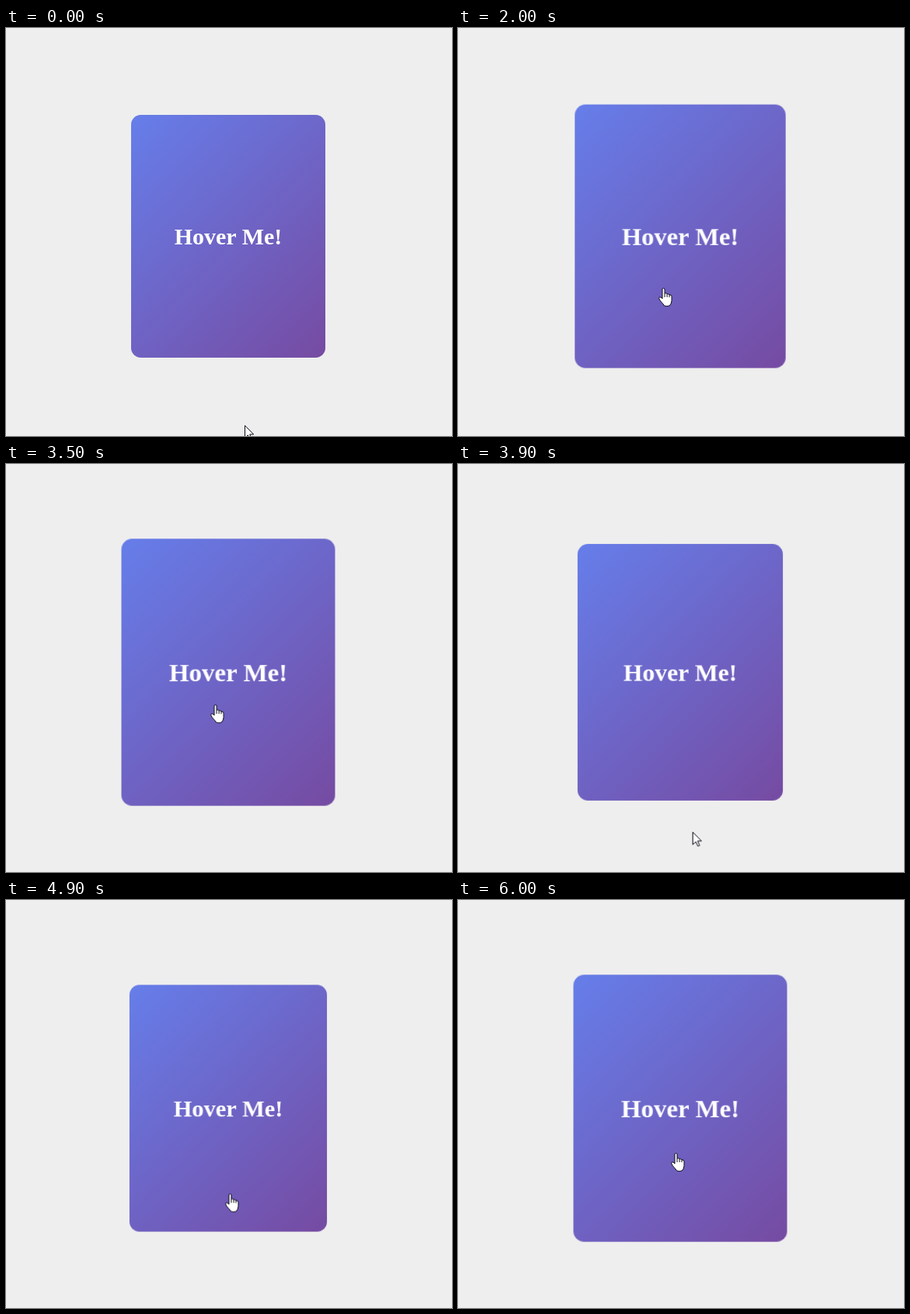
Recreate the animation shown at these times as an HTML page. Size 574 px wide and 526 px high, loop 6.1 s.

```html
<!DOCTYPE html>
<html lang="en">
<head>
<meta charset="utf-8">
<title>Hover card</title>
<style>
  html, body { margin: 0; width: 100%; height: 100%; overflow: hidden; background: #eee; }
  #card {
    position: absolute; left: 161px; top: 112px; width: 250px; height: 313px;
    display: flex; align-items: center; justify-content: center;
    border-radius: 12.5px; will-change: transform;
    background: linear-gradient(135deg, #667eea, #764ba2);
    color: #fff; font: bold 30px "Liberation Serif", serif; white-space: nowrap;
  }
  #cursor { position: absolute; left: 0; top: 0; overflow: visible; }
  #cursor path { fill: #fff; stroke: #0b0b18; stroke-linejoin: round; }
  #cursor .knuckles { fill: none; }
</style>
</head>
<body>
<div id="card">Hover Me!</div>
<svg id="cursor" width="20" height="26">
  <path id="arrow" d="M.5 .5V16.5L4.3 12.9 7 18.6 9.3 17.6 6.7 11.9H11.7Z"/>
  <g id="hand" transform="translate(-6)">
    <path d="M5 14V2Q5 .5 6.5 .5T8 2V7Q10.6 6.2 11.1 8 13.4 7.2 14 9 16.8 8.4 17 11.2V16.5Q16.8 20.5 14.3 23 10.7 24.4 7.5 23C6 20 2 17.5 .7 13.6Q.5 11.2 3 12Z"/>
    <path class="knuckles" d="M8 7V12M11.1 8V12M14 9V12.2"/>
  </g>
</svg>
<script>
const LOOP = 6100, STEP = 100, FADE = 500;
const GLIDE = "cubic-bezier(.35, 0, .5, 1)";
const hovers = [[1720, 3770], [4830, LOOP]];

const el = id => document.getElementById(id);
const card = el("card"), cursor = el("cursor"), arrow = el("arrow"), hand = el("hand");

const key = (time, transform, easing) => ({ offset: time / LOOP, transform, easing });
const scaleAt = (time, scale) => key(time, `scale(${scale})`, "ease");
const pointAt = (time, x, y, easing = "linear") => key(time, `translate(${x}px, ${y}px)`, easing);

function timeline(target, frames) {
  const animation = target.animate(frames, { duration: LOOP, fill: "both" });
  animation.pause();
  return animation;
}

const scaling = hovers.flatMap(([enter, leave]) => [
  scaleAt(enter, 1), scaleAt(enter + FADE, 1.1), scaleAt(leave, 1.1),
  ...(leave < LOOP ? [scaleAt(leave + FADE, 1)] : [])
]);

// Each move runs from a resting point to the next one
const pointing = [
  pointAt(0, 307, 512), pointAt(1450, 307, 512, GLIDE),
  pointAt(2000, 264, 335, "ease-out"), pointAt(2300, 268, 305),
  pointAt(3440, 268, 305, GLIDE), pointAt(4050, 305, 491),
  pointAt(4700, 305, 491, "ease"), pointAt(5200, 280, 326),
  pointAt(LOOP, 280, 326)
];

const timelines = [
  timeline(card, [scaleAt(0, 1), ...scaling]),
  timeline(cursor, pointing)
];

const start = performance.now();
function draw() {
  const elapsed = (performance.now() - start) % LOOP;
  const time = Math.floor(elapsed / STEP) * STEP;
  for (const animation of timelines) animation.currentTime = time;
  const over = hovers.some(([enter, leave]) => time >= enter && time < leave);
  arrow.style.display = over ? "none" : "";
  hand.style.display = over ? "" : "none";
  requestAnimationFrame(draw);
}
draw();
</script>
</body>
</html>
```
